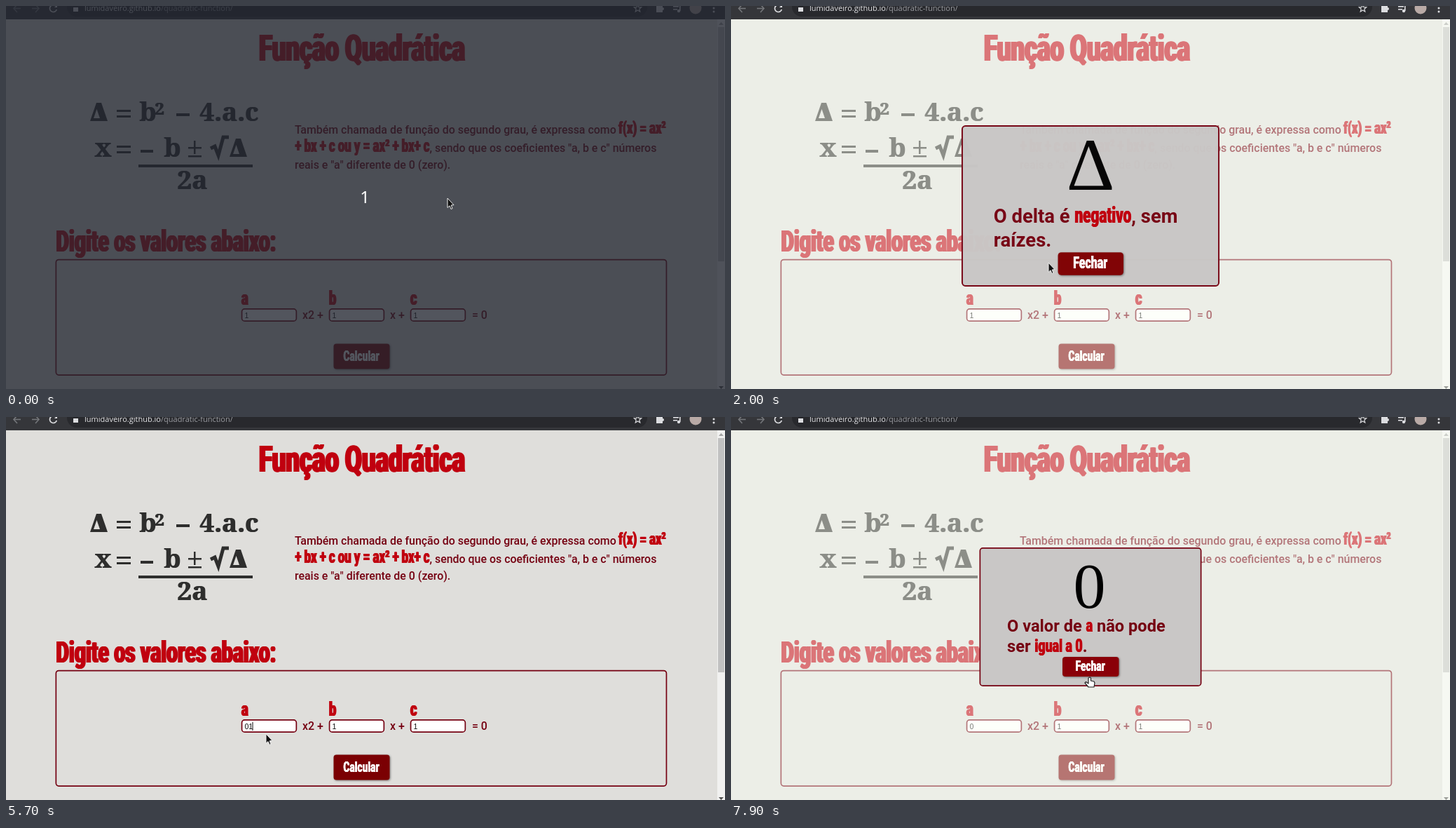
An HTML page with a canvas that plays this animation: 1026x546 px, repeating every 8000 ms.

```html
<!DOCTYPE html>
<html lang="pt">
<head>
<meta charset="utf-8">
<title>Função Quadrática</title>
<style>
html, body { margin: 0; width: 100%; height: 100%; overflow: hidden; background: #dfdedb; }
canvas { display: block; }
</style>
</head>
<body>
<canvas width="1026" height="546"></canvas>
<script>
const c = document.querySelector('canvas').getContext('2d');
const RED = '#c0000f', WINE = '#750011', INK = '#2e2e2d', BUTTON = '#7b0003', HOVER = '#880006';
const LOOP = 8000, STEP = 100, CONDENSED = 0.67;

// Pointer path: time, x, y
const path = [
  [0, 630, 274], [500, 630, 274], [600, 547, 300], [1200, 547, 300], [1600, 508, 490],
  [1700, 508, 490], [2000, 453, 366], [2600, 505, 360], [2800, 505, 360], [3500, 492, 498],
  [3600, 492, 498], [3700, 359, 435], [5300, 359, 435], [5800, 374, 456], [6200, 374, 456],
  [6700, 505, 490], [7300, 505, 490], [7900, 512, 371]
];
const scrolls = [[0, 0], [600, 193], [800, 130], [900, 60], [1000, 10], [1200, 0]];
const values = [[0, '1'], [4000, '01'], [6300, '0']];
const carets = [[0, 0], [3700, 341], [4000, 347], [4800, 341], [5400, 352], [6000, 0]];
const dialogs = [
  { from: 1700, to: 2900, symbol: 'Δ', base: -20,
    lines: [['O delta é ', '*negativo', ', sem'], ['raízes.']] },
  { from: 6741, to: LOOP, symbol: '0', base: -13,
    lines: [['O valor de ', '*a', ' não pode'], ['ser ', '*igual a 0', '.']] }
];

const held = (list, t) => list.filter(item => item[0] <= t).pop()[1];
const inside = ([x, y], l, t, r, b) => x >= l && x <= r && y >= t && y <= b;

function pointerAt(t) {
  const i = path.findIndex(p => p[0] > t);
  if (i < 0) return path[path.length - 1].slice(1);
  const [a, b] = [path[i - 1], path[i]], u = (t - a[0]) / (b[0] - a[0]);
  return [a[1] + (b[1] - a[1]) * u, a[2] + (b[2] - a[2]) * u];
}

function text(s, x, y, font, color, align = 'left') {
  c.font = font;
  c.fillStyle = color;
  c.textAlign = align;
  c.fillText(s, x, y);
  return x + c.measureText(s).width;
}

const body = (s, x, y, size = 15.92, weight = 500) =>
  text(s, x, y, `${weight} ${size}px Roboto, sans-serif`, WINE);

// Heavy condensed face; "bold" thickens the upright strokes only
function display(s, x, y, size, color = RED, align = 'left', bold = 0.035) {
  c.save();
  c.translate(x, y);
  c.scale(CONDENSED, 1);
  const font = `900 ${size}px Roboto, sans-serif`, shift = size * bold;
  for (const dx of [-shift, shift]) text(s, dx, 0, font, color, align);
  const width = text(s, 0, 0, font, color, align);
  c.restore();
  return x + width * CONDENSED;
}

function rect(x, y, w, h, color) {
  c.fillStyle = color;
  c.fillRect(x, y, w, h);
}

function frame(x, y, w, h, fill, line = 1.7) {
  c.beginPath();
  c.roundRect(x + line / 2, y + line / 2, w - line, h - line, 4);
  if (fill) { c.fillStyle = fill; c.fill(); }
  c.strokeStyle = WINE;
  c.lineWidth = line;
  c.stroke();
}

function button(label, x, y, w, h, base, color) {
  c.save();
  c.shadowColor = 'rgba(0,0,0,.45)';
  c.shadowBlur = 3;
  c.shadowOffsetX = c.shadowOffsetY = 1;
  c.beginPath();
  c.roundRect(x, y, w, h, 4);
  c.fillStyle = color;
  c.fill();
  c.restore();
  display(label, x + w / 2 - 0.5, base, 20.5, '#fff', 'center', 0.01);
}

function poly(points, fill, stroke, width = 1) {
  c.beginPath();
  points.forEach(([x, y]) => c.lineTo(x, y));
  if (fill) { c.closePath(); c.fillStyle = fill; c.fill(); }
  if (stroke) { c.strokeStyle = stroke; c.lineWidth = width; c.stroke(); }
}

function disc(x, y, r, color) {
  c.beginPath();
  c.arc(x, y, r, 0, 7);
  c.fillStyle = color;
  c.fill();
}

function delta(x, y) {
  poly([[x, y], [x + 9, y - 26], [x + 16, y - 26], [x + 25, y]], INK);
  poly([[x + 5, y - 4], [x + 9.5, y - 17], [x + 14, y - 4]], '#dfdedb');
}

function formula() {
  const serif = (s, x, y, size = 37) => {
    for (const dx of [0, 1]) text(s, x + dx, y, `900 ${size}px "Noto Serif", serif`, INK);
  };
  delta(120, 164);
  serif('b', 190, 164);
  serif('2', 212, 155, 24);
  serif('4.a.c', 276, 164);
  serif('x', 126, 215);
  serif('b', 225, 215);
  serif('2a', 244, 261);
  for (const y of [148, 199]) {
    rect(158, y, 20, 3, INK);
    rect(158, y + 8, 20, 3, INK);
  }
  rect(243, 153, 19, 4, INK);
  rect(192, 205, 18, 4, INK);
  rect(260, 201, 19, 2.5, INK);
  rect(268, 192, 2.5, 19, INK);
  rect(260, 213, 19, 2.5, INK);
  poly([[292, 203], [298, 200], [303, 213], [310, 187], [318, 187]], null, INK, 5);
  delta(319, 215);
  rect(189, 226, 163, 4, INK);
}

function page(t, pointer) {
  const scroll = held(scrolls, t);
  rect(0, 0, 1026, 546, '#dfdedb');
  c.save();
  c.translate(0, -scroll);
  display('Função Quadrática', 508, 78, 52, RED, 'center');
  formula();
  body('Também chamada de função do segundo grau, é expressa como', 412, 182);
  display('f(x) = ax²', 874, 182, 24.7);
  const x = display('+ bx + c ou y = ax² + bx+ c', 412.5, 208, 25);
  body(', sendo que os coeficientes "a, b e c" números', x, 208);
  body('reais e "a" diferente de 0 (zero).', 412, 232);

  display('Digite os valores abaixo:', 71.5, 350, 42.4);
  frame(70.5, 360.7, 872.8, 166.2);
  [['a', 336, held(values, t)], ['b', 461, '1'], ['c', 577, '1']].forEach(([name, left, value]) => {
    display(name, left, 426, 27);
    frame(left - 0.3, 431, 79.5, 19, '#fff');
    text(value, left + 4.5, 444.5, '10.5px "Liberation Sans", sans-serif', '#111');
  });
  body('x2 +', 423, 446);
  body('x +', 548, 446);
  body('= 0', 665, 446);
  const caret = held(carets, t);
  if (caret) rect(caret - 0.5, 435, 1, 12, '#000');
  const over = inside(pointer, 467, 481 - scroll, 546, 518 - scroll);
  button('Calcular', 467.5, 481.5, 80, 36, 506, over ? HOVER : BUTTON);

  display('Resultados:', 71.5, 596, 42.4);
  [["x'=", 101], ["x''=", 103], ['Discriminante (Δ) =', 219],
   ['Concavidade da parábola (Abertura) para:', 377]].forEach(([label, left], i) => {
    const y = 614 + 37.4 * i;
    body(label, 79, y + 15);
    frame(left, y, 150, 22, '#fff');
  });
  c.restore();

  rect(1015, 19, 11, 527, '#f1f1f0');
  rect(1016, 30 + scroll * 0.632, 9, 334, '#c1c1c1');
  poly([[1017, 27], [1020.5, 23], [1024, 27]], scroll ? '#505050' : '#a3a3a3');
  poly([[1017, 542], [1020.5, 546], [1024, 542]], '#505050');
}

function toolbar() {
  const light = '#dcdde0', dim = '#74767a';
  rect(0, 0, 1026, 19, '#35363a');
  c.beginPath();
  c.roundRect(87, -14, 828, 29, 14);
  c.fillStyle = '#28292d';
  c.fill();
  for (const [x, d] of [[16, -1], [42, 1]]) {
    poly([[x - 5 * d, 3.5], [x + 5 * d, 3.5]], null, dim, 1.6);
    poly([[x, -2], [x + 5 * d, 3.5], [x, 9]], null, dim, 1.6);
  }
  c.beginPath();
  c.arc(67.5, 3.5, 5, 0.3, 5.4);
  c.strokeStyle = light;
  c.lineWidth = 1.7;
  c.stroke();
  poly([[69, 2], [73, 2], [73, -2]], light);
  rect(96, 2, 7, 6, light);
  const font = '11px "Open Sans", sans-serif';
  const x = text('lumidaveiro.github.io', 112, 7, font, '#e4e5e8');
  text('/quadratic-function/', x, 7, font, '#9a9ca1');
  const star = Array.from({ length: 11 }, (_, i) => {
    const r = i % 2 ? 2.4 : 5.5, a = i * Math.PI / 5 - Math.PI / 2;
    return [901.5 + r * Math.cos(a), 3.5 + r * Math.sin(a)];
  });
  poly(star, null, light, 1.2);
  rect(928, 0, 9, 9, light);
  disc(937, 4, 2, light);
  disc(932, 0, 2, light);
  rect(952, 0, 8, 1.6, light);
  rect(952, 4, 6, 1.6, light);
  rect(961, -1, 1.6, 8, light);
  disc(960, 7, 2.2, light);
  disc(984, 3, 8.5, '#b9aaa6');
  for (const y of [-2, 3, 8]) disc(1010, y, 1.5, light);
}

function dialog(d, t, pointer) {
  const e = t - d.from, grow = Math.min(1, e / 310);
  const u = Math.min(1, Math.max(0, (e - 310) / 300));
  const size = 1.2 * grow - 0.2 * u * u * (3 - 2 * u);
  rect(0, 19, 1026, 527, 'rgba(251,254,243,.46)');
  c.save();
  c.globalAlpha = grow;
  c.translate(513, 285);
  c.scale(size, size);
  frame(-158.5, -99, 317, 198, '#c9c7c6');
  text(d.symbol, d.symbol === '0' ? -1.5 : 0, d.base, '92px "Liberation Serif", serif', '#000', 'center');
  d.lines.forEach((parts, i) => parts.reduce((x, s) => s[0] === '*'
    ? display(s.slice(1), x, 21 + 29 * i, 26.6, RED, 'left', 0.02)
    : body(s, x, 21 + 29 * i, 23.6, 700), -119));
  button('Fechar', -40, 57, 80.5, 28, 77, inside(pointer, 473, 342, 554, 372) ? '#8a0008' : '#820003');
  c.restore();
}

function cursor([x, y], modal) {
  const hand = modal ? inside([x, y], 473, 342, 554, 372) : inside([x, y], 467, 481, 546, 518);
  c.save();
  c.translate(x, y);
  c.lineJoin = 'round';
  if (hand) {
    poly([[-2, 1], [0, 0], [1.5, 1], [1.5, 5], [6, 6], [7, 8], [6, 14], [-2, 14], [-7, 8],
      [-5.5, 6.5], [-2, 9], [-2, 1]], '#fff', '#222', 1.2);
  } else if (!modal && inside([x, y], 336, 431, 415, 450)) {
    poly([[-3, -6], [3, -6]], null, '#222', 1);
    poly([[0.5, -6], [0.5, 6]], null, '#222', 1.2);
    poly([[-3, 6], [3, 6]], null, '#222', 1);
  } else {
    poly([[0, 0], [0, 13.5], [3, 10.8], [5, 15.5], [7, 14.6], [5.2, 10], [9, 9.6]],
      '#111', '#eee', 1);
  }
  c.restore();
}

function draw() {
  const t = Math.floor(performance.now() % LOOP / STEP) * STEP;
  const pointer = pointerAt(t);
  const open = dialogs.find(d => t > d.from && t < d.to);
  page(t, pointer);
  if (open) dialog(open, t, pointer);
  toolbar();
  if (t < 300) {
    c.save();
    c.globalAlpha = 1 - t / 300;
    rect(0, 0, 1026, 546, 'rgba(34,38,48,.78)');
    text('1', 512, 281, '24px "Noto Sans", sans-serif', '#fff', 'center');
    c.restore();
  }
  cursor(pointer, open);
  requestAnimationFrame(draw);
}
draw();
</script>
</body>
</html>
```
